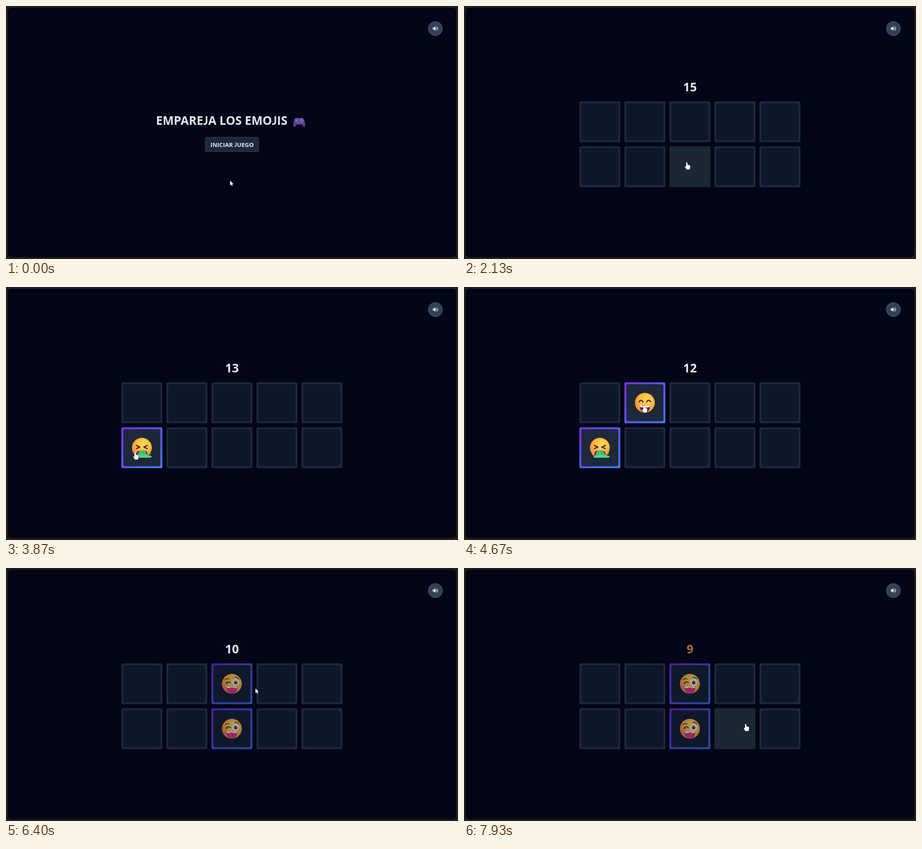
An HTML page with a canvas that plays this animation: 999x560 px, repeating every 8 s.

```html
<!DOCTYPE html>
<html lang="es">
<head>
<meta charset="utf-8">
<title>Empareja los emojis</title>
<style>
  html, body { margin: 0; width: 100%; height: 100%; overflow: hidden; background: #1f1f1f; }
  canvas { display: block; width: 999px; height: 560px; }
</style>
</head>
<body>
<canvas id="stage" width="999" height="560"></canvas>
<script>
const ctx = document.getElementById('stage').getContext('2d');
const LOOP = 8000, GAME_START = 1330, MATCHED_AT = 6100;
const CARD = 90.5, PITCH = 99.5, LEFT = 255, TOP = 211;
const INK = '#3f2640', TEXT = '#e2e8f0';

// Pointer path: time, x, y of the hot spot
const PATH = [
  [0, 495, 386], [330, 495, 386], [800, 499, 316], [1690, 499, 316],
  [2130, 493, 346], [2330, 493, 346], [2470, 391, 352], [3190, 391, 352],
  [3530, 286, 366], [3870, 286, 366], [4330, 398, 262], [4900, 398, 262],
  [5440, 486, 357], [5760, 486, 357], [6070, 498, 269], [6240, 498, 269],
  [6400, 551, 266], [6730, 587, 262], [6900, 587, 262], [7730, 620, 340],
  [7930, 623, 345], [8000, 623, 345]
];
// Turned cards: column, row, from, to, face
const FLIPS = [
  [2, 1, 2360, 3400, 'wink'], [1, 1, 2800, 3400, 'cool'],
  [0, 1, 3860, 5260, 'sick'], [1, 0, 4670, 5260, 'laugh'],
  [2, 1, 5730, LOOP, 'wink'], [2, 0, 6060, LOOP, 'wink']
];
// Highlighted cards: column, row, from, to
const HOVERS = [
  [2, 1, GAME_START, 2360], [2, 1, 5320, 5730], [3, 0, 6930, 7400], [3, 1, 7480, LOOP]
];

const clamp = v => Math.max(0, Math.min(1, v));
const smooth = v => v * v * (3 - 2 * v);
const within = (t, [col, row, from, to], c, r) => col === c && row === r && t >= from && t < to;

function box(x, y, w, h, r, fill) {
  ctx.beginPath();
  ctx.roundRect(x, y, w, h, r);
  ctx.fillStyle = fill;
  ctx.fill();
}

function ellipse(x, y, rx, ry, fill, angle = 0) {
  ctx.beginPath();
  ctx.ellipse(x, y, rx, ry, angle, 0, Math.PI * 2);
  ctx.fillStyle = fill;
  ctx.fill();
}

function shape(d, fill, stroke, width = 1) {
  const path = new Path2D(d);
  if (stroke) {
    ctx.strokeStyle = stroke;
    ctx.lineWidth = width;
    ctx.lineJoin = ctx.lineCap = 'round';
    ctx.stroke(path);
  }
  if (fill) {
    ctx.fillStyle = fill;
    ctx.fill(path);
  }
}

function at(x, y, draw) {
  ctx.save();
  ctx.translate(x, y);
  draw();
  ctx.restore();
}

// The J comes from Lato, whose J rests on the baseline
function label(text, x, y, size) {
  ctx.fillStyle = TEXT;
  for (const run of text.split(/(J)/)) {
    ctx.font = `700 ${size}px ${run === 'J' ? 'Lato' : '"Open Sans"'}, sans-serif`;
    ctx.fillText(run, x, y);
    x += ctx.measureText(run).width;
  }
}

function gradient(x0, y0, x1, y1, ...colors) {
  const g = ctx.createLinearGradient(x0, y0, x1, y1);
  colors.forEach((c, i) => g.addColorStop(i / (colors.length - 1), c));
  return g;
}

function head() {
  const g = ctx.createRadialGradient(6, -9, 2, 2, -3, 26);
  g.addColorStop(0, '#ffd75a');
  g.addColorStop(0.55, '#ffbc3d');
  g.addColorStop(1, '#f58a32');
  ellipse(0, 0, 22, 22, g);
}

function laughMouth() {
  shape('M-11.5 5 Q0 8 11.5 5 Q11 21 0 21.5 Q-11 20 -11.5 5Z', '#5b1d45');
  shape('M-11.3 5 Q0 8 11.3 5 L10.6 9.5 Q0 12 -10.6 9.5Z', '#f5eef5');
}

const FACES = {
  wink() {
    head();
    const blush = ctx.createRadialGradient(-17, 12, 1, -17, 12, 16);
    blush.addColorStop(0, 'rgba(240,80,120,.6)');
    blush.addColorStop(1, 'rgba(240,80,120,0)');
    ellipse(0, 0, 22, 22, blush);
    laughMouth();
    shape('M-9.5 11 Q0 5.5 9.5 11 Q6 21.5 0 22 Q-6 21 -9.5 11Z', '#f0288c');
    shape('M0 11 L0 17', null, '#c41a78', 1);
    ellipse(8.5, -3, 7.6, 7.6, '#f4eef4');
    ellipse(8.5, -2.6, 3.6, 3.8, INK);
    ellipse(9.5, -4, 1, 1, '#fff');
    shape('M-13 -1.5 Q-8 -7 -3 -2 M-13 -1.5 L-10 -1', null, INK, 2.1);
    shape('M-15 -9 Q-11 -12.5 -6 -10.5 M7 -14 Q12 -15 15.5 -10.5', null, '#6a3b2b', 1.9);
  },
  sick() {
    head();
    shape('M-12 -5 L-4.5 -1.5 L-12 2 M12 -5 L4.5 -1.5 L12 2', null, INK, 2.6);
    shape('M-12 19 Q-14 7 -6 6.5 L7 6.5 Q14 7 12 19Z', '#a3127f');
    shape('M-7 7 Q0 5 8 7 Q9 14 13 17 Q21 16 22 21 Q14 23 5 22 L-13 22 Q-16 19 -10 17 Q-6 14 -7 7Z',
      gradient(0, 5, 0, 22, '#31b964', '#52df83'));
    shape('M-3 10 L-4 16 M3 9 L5 16', null, '#259c55', 1);
    ellipse(18.5, 13.5, 1.2, 1.2, '#4fd87f');
    ellipse(-16, 15, 1.3, 1.3, '#4fd87f');
  },
  cool() {
    head();
    shape('M-19 -7 L19 -7 Q18 4 9 4 Q3 4 1.5 -3 L-1.5 -3 Q-3 4 -9 4 Q-18 4 -19 -7Z', '#34263f');
    shape('M-9 11 Q1 17 10 10', null, INK, 2.2);
  },
  laugh() {
    head();
    laughMouth();
    shape('M-13 -2 Q-8.5 -9 -4 -2 M4 -2 Q8.5 -9 13 -2', null, INK, 2.4);
  }
};

function drawCard(t, col, row) {
  const x = LEFT + col * PITCH, y = TOP + row * PITCH;
  const flip = FLIPS.find(f => within(t, f, col, row));
  const hover = HOVERS.find(h => within(t, h, col, row));
  if (!flip) {
    box(x, y, CARD, CARD, 3, '#1d293b');
    box(x + 4.3, y + 4.3, CARD - 8.6, CARD - 8.6, 4, '#0f172a');
    if (hover) {
      ctx.globalAlpha = clamp((t - hover[2] + 60) / 150);
      box(x, y, CARD, CARD, 3, '#1c2736');
      ctx.globalAlpha = 1;
    }
    return;
  }
  const [, , , to, face] = flip;
  const matched = to === LOOP && t >= MATCHED_AT;
  ctx.globalAlpha = matched ? 0.6 : 1;
  box(x, y, CARD, CARD, 3, gradient(x, y, x + CARD, y + CARD, '#7f2bf6', '#3b7ef8'));
  ctx.globalAlpha = 1;
  box(x + 4.3, y + 4.3, CARD - 8.6, CARD - 8.6, 4, matched ? '#10192b' : '#1d293b');
  at(x + CARD / 2, y + CARD / 2, () => FACES[face]());
  if (matched) {
    at(x + CARD / 2, y + CARD / 2, () => ellipse(0, 0, 23, 23, 'rgba(16,25,43,.33)'));
  }
}

function drawCounter(t) {
  const value = 15 - Math.floor((t - GAME_START) / 1000);
  const low = value < 10;
  if (low) {
    const start = GAME_START + 6000;
    ctx.globalAlpha = 1 - 0.5 * smooth(clamp((t - start - 50) / 1000));
  }
  ctx.font = '700 26.5px "Open Sans", sans-serif';
  ctx.textAlign = 'center';
  ctx.fillStyle = low ? '#fb8c3c' : TEXT;
  ctx.fillText(value, 499.5, 188.7);
  ctx.textAlign = 'left';
  ctx.globalAlpha = 1;
}

function drawGamepad() {
  shape('M-7 -9 Q-4 -10 -2 -8.5 L2 -8.5 Q4 -10 7 -9 Q10 -8.5 11.5 -3 Q14 5 13 9 Q11.5 12 8.5 9.5 ' +
    'L5.5 5.5 L-5.5 5.5 L-8.5 9.5 Q-11.5 12 -13 9 Q-14 5 -11.5 -3 Q-10 -8.5 -7 -9Z',
    gradient(0, -10, 0, 11, '#6d4a9c', '#583188'));
  shape('M-6 -5.5 L-6 -1.5 M-8 -3.5 L-4 -3.5', null, '#4d9be0', 1.5);
  ellipse(-3, 1.5, 1.6, 1.6, '#4d80c8');
  ellipse(3, 1.5, 1.6, 1.6, '#4d80c8');
  ellipse(0, -5.5, 1, 1, '#58b6d8');
  ellipse(6, -6, 1.2, 1.2, '#f0a04a');
  ellipse(3.6, -3.5, 1.2, 1.2, '#45b9e8');
  ellipse(8.4, -3.5, 1.2, 1.2, '#e75b9b');
  ellipse(6, -1, 1.2, 1.2, '#54c789');
}

function drawIntro(t) {
  label('EMPAREJA LOS EMOJIS', 331.6, 263.3, 26.1);
  at(648, 257, drawGamepad);
  box(440, 290, 119, 33, 4, '#334155');
  ctx.globalAlpha = 1 - clamp((t - 680) / 120);
  box(441, 291, 117, 31, 3, '#1e293b');
  ctx.globalAlpha = 1;
  label('INICIAR JUEGO', 451.8, 311.6, 13.1);
}

function drawSpeaker() {
  ellipse(949, 50, 16, 16, '#526074');
  ellipse(949, 50, 15, 15, '#334155');
  shape('M943.8 47.9 L945.8 47.9 L948.9 45.3 L948.9 54.3 L945.8 51.7 L943.8 51.7Z', '#f1f5f9', '#f1f5f9', 0.5);
  shape('M950.8 47.9 Q952.2 49.8 950.8 51.7 M952.6 46 Q955.8 49.8 952.6 53.6', null, '#f1f5f9', 1.1);
}

function pointer(t) {
  const i = Math.max(1, PATH.findIndex(p => p[0] > t));
  const [t0, x0, y0] = PATH[i - 1], [t1, x1, y1] = PATH[i];
  const k = smooth(clamp((t - t0) / (t1 - t0)));
  return [x0 + (x1 - x0) * k, y0 + (y1 - y0) * k];
}

function overCard(t, x, y) {
  const col = Math.floor((x - LEFT) / PITCH), row = Math.floor((y - TOP) / PITCH);
  const inside = col >= 0 && col < 5 && row >= 0 && row < 2 &&
    x - LEFT - col * PITCH < CARD && y - TOP - row * PITCH < CARD;
  return inside && !(col === 2 && t >= MATCHED_AT);
}

function drawPointer(t) {
  const [x, y] = pointer(t);
  const hand = t >= GAME_START && overCard(t, x, y);
  at(x, y, () => hand
    ? shape('M-2 1 Q-.6 -.8 .8 1 L.8 5.5 Q2 4.6 3 6 Q4.2 5.2 5 6.6 Q6.6 6 7 7.8 L6.8 12 ' +
        'Q6.4 14 5.6 16 L-1.2 16 Q-2.2 13.5 -4.6 10.4 Q-5 8.4 -3.2 8.8 L-2 10Z', '#fff', '#0b0d14', 0.9)
    : shape('M.3 .5 L.3 11 L2.7 8.9 L4.3 12.4 L6 11.6 L4.5 8.2 L7.6 7.9Z', '#fff', '#0b0d14', 0.9));
}

function render(t) {
  ctx.fillStyle = '#1f1f1f';
  ctx.fillRect(0, 0, 999, 560);
  box(4, 4, 991, 552, 7, '#020617');
  drawSpeaker();
  if (t < GAME_START) {
    drawIntro(t);
  } else {
    drawCounter(t);
    for (let i = 0; i < 10; i++) drawCard(t, i % 5, Math.floor(i / 5));
  }
  drawPointer(t);
}

const began = performance.now();
function tick() {
  render((performance.now() - began) % LOOP);
  requestAnimationFrame(tick);
}
tick();
</script>
</body>
</html>
```
